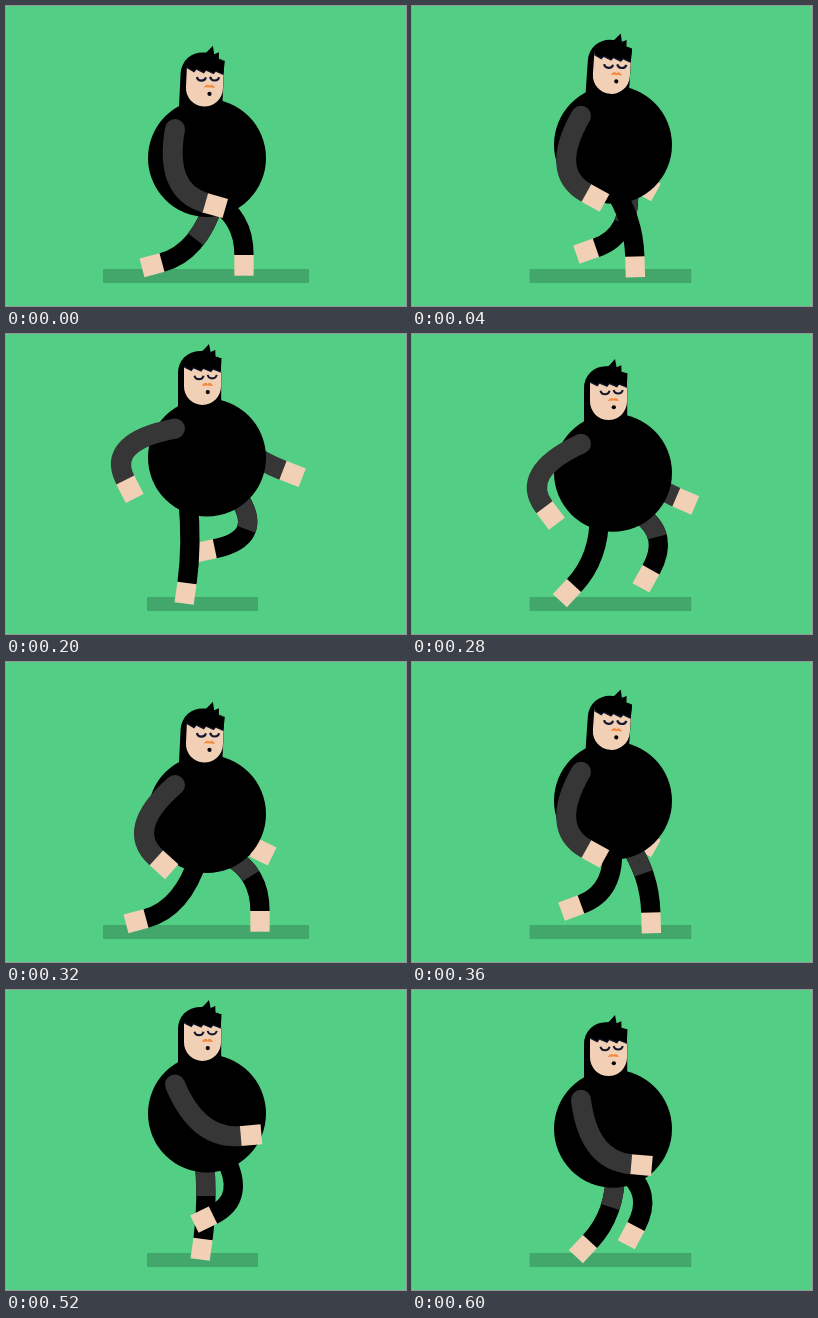
These frames come from a looping animation (400 by 300 pixels, 640 ms). An HTML page with a canvas:

```html
<!DOCTYPE html>
<html lang="en">
<head>
<meta charset="utf-8">
<title>Walk cycle</title>
<style>
html, body { margin: 0; width: 100%; height: 100%; overflow: hidden; background: #52cf84; }
canvas { display: block; width: 400px; height: 300px; }
</style>
</head>
<body>
<canvas id="stage"></canvas>
<script>
const LOOP = 640, HALF = LOOP / 2, STEP = 40;
const BLACK = '#000', GREY = '#363636', SKIN = '#f2d0b5', NAVY = '#14182f', ORANGE = '#f58a3c';

const canvas = document.getElementById('stage');
const ctx = canvas.getContext('2d');
const ratio = window.devicePixelRatio || 1;
canvas.width = 400 * ratio;
canvas.height = 300 * ratio;

// Ankle path of one stride: time, x, y, foot angle from straight down
const stride = [
  [0, 238, 249, 0],
  [120, 186, 249.5, 5],
  [200, 181, 249, 8],
  [280, 162, 251.5, 43],
  [320, 140, 256.5, 75],
  [360, 169, 242.5, 70],
  [440, 203, 227.5, 65],
  [520, 207, 225, 64],
  [600, 224, 236.5, 28]
];

const near = { x: 169, y: -29, length: 77.5, stretch: 6, twist: 34 };
const far = { x: 221, y: -31, length: 69, stretch: 2, twist: 8 };

const rad = deg => deg * Math.PI / 180;
const wave = (t, peak, period) => Math.cos(2 * Math.PI * (t - peak) / period);
const clamp = v => Math.min(1, Math.max(0, v));
const mix = (a, b, k) => [a[0] + (b[0] - a[0]) * k, a[1] + (b[1] - a[1]) * k];
const move = ([x, y], deg, d) => [x + Math.sin(rad(deg)) * d, y + Math.cos(rad(deg)) * d];

// Smooth cyclic interpolation through unevenly spaced keys
function sample(keys, t) {
  const n = keys.length;
  let i = n - 1;
  while (keys[i][0] > t) i--;
  const key = j => keys[(j + n) % n];
  const time = j => key(j)[0] + Math.floor(j / n) * LOOP;
  const [t0, t1, t2, t3] = [i - 1, i, i + 1, i + 2].map(time);
  const span = t2 - t1, u = (t - t1) / span;
  return key(i).slice(1).map((b, j) => {
    const a = key(i - 1)[j + 1], c = key(i + 1)[j + 1], d = key(i + 2)[j + 1];
    const m1 = (c - a) / (t2 - t0) * span, m2 = (d - b) / (t3 - t1) * span;
    return b + u * (m1 + u * (3 * (c - b) - 2 * m1 - m2 + u * (2 * (b - c) + m1 + m2)));
  });
}

function stroke(color, width, trace) {
  ctx.strokeStyle = color;
  ctx.lineWidth = width;
  ctx.beginPath();
  trace();
  ctx.stroke();
}

function shape(color, points) {
  ctx.fillStyle = color;
  ctx.beginPath();
  points.forEach(p => ctx.lineTo(...p));
  ctx.fill();
}

function disc(color, x, y, r) {
  ctx.fillStyle = color;
  ctx.beginPath();
  ctx.arc(x, y, r, 0, 7);
  ctx.fill();
}

function curve(color, width, [a, b, c]) {
  stroke(color, width, () => {
    ctx.moveTo(...a);
    ctx.quadraticCurveTo(...b, ...c);
  });
}

// First part of a quadratic curve
function part([a, b, c], k) {
  const ab = mix(a, b, k);
  return [a, ab, mix(ab, mix(b, c, k), k)];
}

// A bent tube that runs straight into its hand or foot
function limb(color, width, root, joint, angle, reach) {
  const path = [root, move(joint, angle, -reach), joint];
  stroke(SKIN, width, () => {
    ctx.moveTo(...move(joint, angle, -1));
    ctx.lineTo(...move(joint, angle, 20.7));
  });
  curve(color, width, path);
  return path;
}

// swing runs from -1 (back) to 1 (front)
function arm({ x, y, length, stretch, twist }, bodyY, swing) {
  const root = [x, bodyY + y];
  const wrist = move(root, 4 + 48 * swing, length + stretch * swing);
  limb(GREY, 20, root, wrist, 61 + twist * swing, 43);
  disc(GREY, ...root, 10);
}

// tuck lifts the foot further back while it passes under the body
function leg(t, bodyY, shift, tuck) {
  const [x, y, angle] = sample(stride, t);
  const lift = tuck * Math.max(0, wave(t, 480, LOOP)) ** 3;
  const hip = [200 + shift + 18 * wave(t, 520, LOOP), bodyY + 42];
  const ankle = [x + shift - 18 * lift, y - 13 * lift];
  return limb(BLACK, 19.3, hip, ankle, -angle - 18 * lift, 38 + 15 * lift);
}

function eye(x, y) {
  stroke(NAVY, 2.1, () => {
    ctx.moveTo(x - 4.5, y - 1.8);
    ctx.bezierCurveTo(x - 3.5, y + 2.8, x + 3.5, y + 2.8, x + 4.5, y - 1.8);
  });
}

function fringe(color, drop) {
  const points = [[215.3, 24], [178, 24], [178, 32 + drop]];
  for (let i = 0; i < 4; i++) {
    points.push([185.5 + i * 9.8, 35.8 + drop + i * 0.5], [187.5 + i * 9.8, 33 + drop + i * 0.6]);
  }
  shape(color, points.slice(0, -1));
}

function head(y, k) {
  ctx.save();
  ctx.translate(190 + 0.6 * k, y - 38.5 + 1.3 * k);
  ctx.rotate(rad(4 * k));
  ctx.translate(-190, -85);

  ctx.fillStyle = BLACK;
  ctx.beginPath();
  ctx.moveTo(172, 84);
  ctx.arc(193.6, 38.5, 21.6, Math.PI, 0);
  ctx.lineTo(215.2, 84);
  ctx.fill();

  ctx.fillStyle = SKIN;
  ctx.beginPath();
  ctx.moveTo(178, 30);
  ctx.arc(196.5, 52.3, 18.5, Math.PI, 0, true);
  ctx.lineTo(215, 30);
  ctx.fill();

  fringe(NAVY, 1.4);
  fringe(BLACK, 0);
  shape(BLACK, [[190, 19], [197, 16.5], [203, 9.8], [204.6, 18], [209.3, 16], [209.5, 22.5],
    [213.5, 23.5], [212, 30], [196, 30]]);

  eye(193, 43.4);
  eye(206.2, 42.6);
  ctx.fillStyle = ORANGE;
  ctx.beginPath();
  ctx.moveTo(195.6, 51.8);
  ctx.quadraticCurveTo(199, 47, 201.4, 49.8);
  ctx.quadraticCurveTo(204.2, 47, 207.2, 51.8);
  ctx.quadraticCurveTo(201.4, 50.8, 195.6, 51.8);
  ctx.fill();
  disc(BLACK, 201.8, 58, 2.1);
  ctx.restore();
}

function draw(t) {
  const beat = t % HALF;
  const low = (beat / 160 - 1) ** 2;
  const y = 121.7 + 30.3 * low;
  const swing = -wave(t, 200, LOOP);

  ctx.setTransform(ratio, 0, 0, ratio, 0, 0);
  ctx.fillStyle = '#52cf84';
  ctx.fillRect(0, 0, 400, 300);

  const width = 104.7 + 101.3 * low;
  ctx.fillStyle = '#43a76b';
  ctx.fillRect(196.3 + 3.7 * low - width / 2, 263, width, 14);

  arm(far, y, -swing);
  const thigh = leg((t + HALF) % LOOP, y, 16, 1);
  curve(GREY, 19.3, part(thigh, 0.46));
  leg(t, y, 0, 0);
  disc(BLACK, 201, y, 59);
  head(y, clamp(0.5 + 0.9 * wave(beat, 70, HALF)));
  arm(near, y, swing);
}

const start = performance.now();
function tick() {
  const t = (performance.now() - start) % LOOP;
  draw(Math.floor(t / STEP) * STEP);
  requestAnimationFrame(tick);
}
tick();
</script>
</body>
</html>
```
